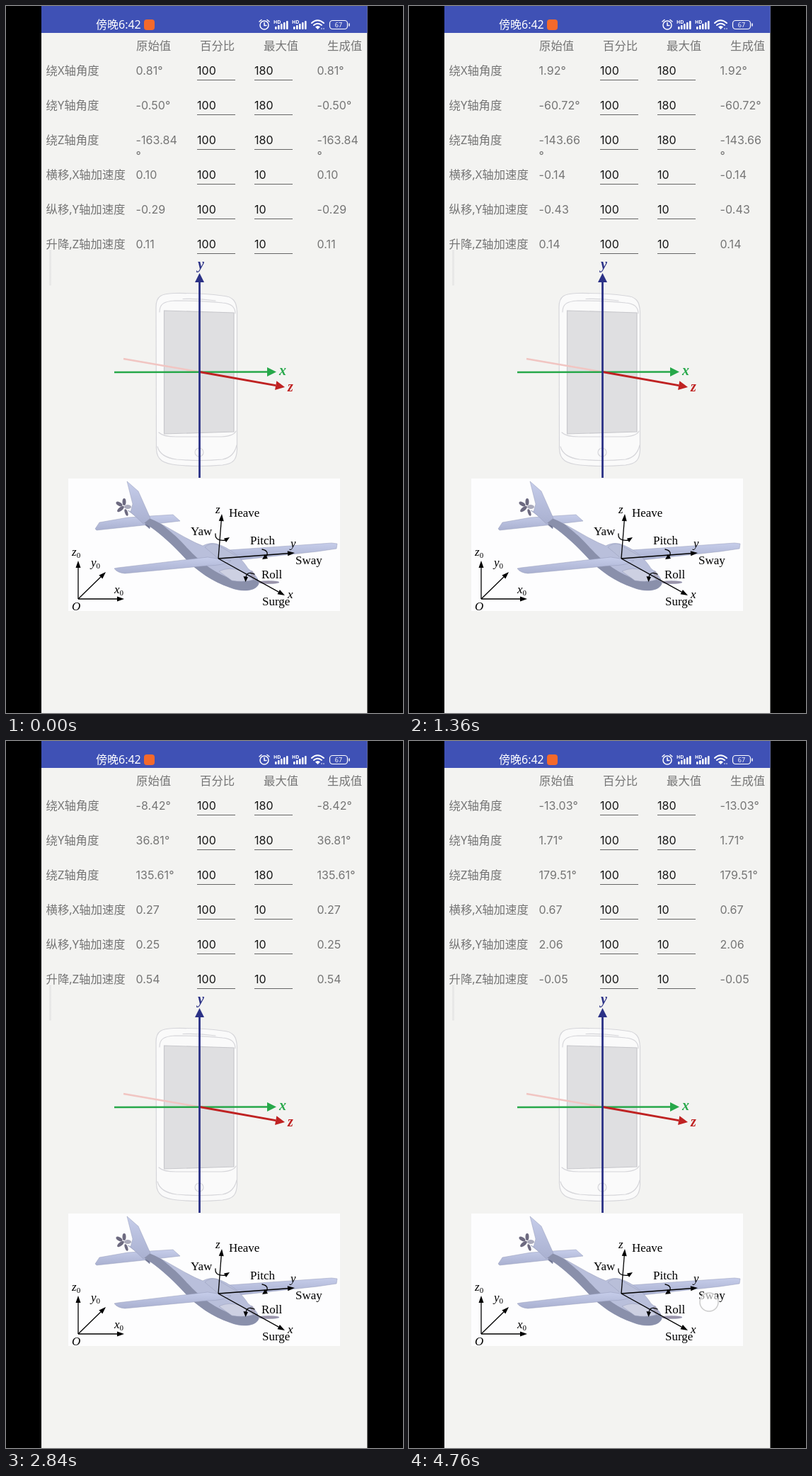
An HTML page for the animation above (4800 ms loop, 561x998 px).

```html
<!DOCTYPE html>
<html lang="zh">
<head>
<meta charset="utf-8">
<title>Motion sensor readout</title>
<style>
html, body { margin: 0; width: 100%; height: 100%; overflow: hidden; background: #000; }
svg { display: block; width: 561px; height: 998px; }
.ui { font: 16.4px "Noto Sans", "Noto Sans CJK SC", "Noto Sans CJK", sans-serif; fill: #757575; }
.num { font: 16px Inter, sans-serif; letter-spacing: .1px; }
.input { fill: #151515; }
.axis { font: italic bold 20px "Liberation Serif", serif; }
.label { font: 17px "Liberation Serif", serif; fill: #000; }
.label .i { font-style: italic; }
.sub { font-size: 11px; font-style: normal; }
.line { fill: none; stroke-linecap: round; }
</style>
</head>
<body>
<svg viewBox="0 0 561 998">
  <defs>
    <linearGradient id="wing" x1="0" y1="0" x2="0" y2="1">
      <stop offset="0" stop-color="#c6cdea"/><stop offset="1" stop-color="#a9b0d0"/>
    </linearGradient>
    <clipPath id="hull"><path id="hullShape" d="M172 712L204 724C228 734 256 754 278 762Q287 757 297 759C318 765 334 781 342 794Q358 806 357 816C352 827 332 827 317 821C288 811 267 795 248 774C232 757 213 740 196 730Z"/></clipPath>
  </defs>
  <rect width="561" height="998"/>
  <rect x="50" width="460.500" height="998" fill="#f3f3f1"/>
  <rect x="50" width="460.500" height="38" fill="#3f51b5"/>

  <!-- status bar -->
  <g fill="#fff" font-family="Noto Sans, Noto Sans CJK SC, sans-serif">
    <text x="127" y="32" font-size="16" font-weight="500">傍晚6:42</text>
    <rect x="195" y="19" width="15" height="15" rx="4" fill="#f4692b"/>
    <g class="line" stroke="#fff" stroke-width="1.500">
      <circle cx="365" cy="27" r="6"/>
      <path d="M365 23.500V27.500H368M358 22L361 19.500M372 22L369 19.500"/>
      <path d="M432 24Q440 16.500 449 24M435 27Q440 22.500 446 27" stroke-width="2"/>
      <rect x="457.500" y="20.500" width="25" height="12" rx="4" stroke-width="1.200"/>
      <path d="M485 25V28"/>
    </g>
    <path d="M437 29.500Q440.500 26.500 444 29.500L440.500 33Z"/>
    <circle cx="446" cy="32" r=".8"/><circle cx="449" cy="32" r=".8"/>
    <text x="470" y="30" font-size="9" font-weight="500" text-anchor="middle">67</text>
    <g id="signals" font-size="7" font-weight="600"></g>
  </g>

  <g id="table" class="ui"></g>
  <path d="M62.500 345V395" stroke="#ddd" stroke-width="3" stroke-dasharray="1 1"/>

  <!-- phone -->
  <g class="line" stroke="#d6d6da" stroke-width="1.200">
    <path d="M212 425C212 409 220 406 237 405.500Q275 405 306 409C321 410 326 417 326.500 432V626C326 641 321 646 306 648Q272 651 242 648C222 646 213 641 212.500 625Z" fill="#fafafa"/>
    <path d="M217 432C217 420 224 417 238 416Q277 416 306 419C319 420 324 426 324 434M214 622Q218 637 241 640Q274 643 306 640Q322 637 326 620"/>
    <path d="M216 602Q222 608 240 608H305Q322 607 325 600M250 413.500Q273 412.500 296 416"/>
    <circle cx="273" cy="630" r="6"/>
    <path d="M223.500 430L322 433V601L223.500 604Z" fill="#dfdfe1" stroke="#c8c8cc"/>
  </g>
  <path d="M166 498L273 516.500" stroke="#f1c5c2" stroke-width="2.500"/>
  <g id="phoneAxes"></g>
  <g class="axis">
    <text x="271" y="371" fill="#2b3186">y</text>
    <text x="386" y="521" fill="#27a84a">x</text>
    <text x="398" y="544" fill="#bf2222">z</text>
  </g>

  <!-- aircraft -->
  <rect x="88" y="667" width="384" height="187" fill="#fdfdfe"/>
  <g stroke="#959bb8" stroke-width=".5">
    <g fill="#6d6a80" stroke="none">
      <ellipse cx="160" cy="703" rx="5" ry="2.500" transform="rotate(30 160 703)"/>
      <ellipse cx="167" cy="700" rx="2.500" ry="5"/>
      <ellipse cx="162" cy="710" rx="2.500" ry="6" transform="rotate(50 162 710)"/>
      <ellipse cx="170" cy="715" rx="2" ry="5" transform="rotate(-20 170 715)"/>
      <ellipse cx="172" cy="707" rx="5" ry="3" fill="#aab"/>
    </g>
    <path d="M126 738L132 729L172 722L236 718L246 727L203 732L128 740Z" fill="url(#wing)"/>
    <path d="M196 732L204 730L203 738Z" fill="#707590"/>
    <path d="M280 774L300 769L460 758L468 759L467 766L440 770L330 782Z" fill="url(#wing)"/>
    <use href="#hullShape" fill="#b9bfdb"/>
    <g class="line" clip-path="url(#hull)">
      <path id="belly" d="M204 734C232 757 232 757 248 774C267 795 288 811 317 821Q336 827 357 820" stroke="#7d829c" stroke-opacity=".5" stroke-width="24"/>
      <use href="#belly" stroke="#4f5368" stroke-width="10"/>
    </g>
    <path d="M281 764Q288 757 298 760L328 778L300 780Z" fill="#b9bfd9"/>
    <path d="M301 798Q315 791 331 797L350 810Q335 814 319 811Z" fill="#cdd0e2"/>
    <path d="M153 794L158 793L285 778L318 783Q307 790 285 790L168 801Q157 800 153 794Z" fill="url(#wing)"/>
    <path d="M171 671L187 685L204 723L194 731L176 714L179 703Z" fill="url(#wing)"/>
    <ellipse cx="371" cy="813.500" rx="15" ry="2" fill="#9a93a8"/>
    <ellipse cx="349" cy="804" rx="2.500" ry="7" fill="#aaa7bb" transform="rotate(-20 349 804)"/>
  </g>
  <g id="planeAxes"></g>
  <path class="line" stroke="#000" stroke-width="1.300" d="M296 745Q295 756 311 754M362 767Q372 769 368 777M351 802Q340 797 339 807"/>
  <path d="M316 750L308 751.500L311 757ZM362 781L370 780L366 774ZM338.500 813L335.500 805L342 806Z"/>
  <g class="label">
    <text x="315" y="721">Heave</text><text x="261" y="747">Yaw</text>
    <text x="345" y="760">Pitch</text><text x="409" y="788">Sway</text>
    <text x="361" y="808">Roll</text><text x="362" y="846">Surge</text>
    <g class="i">
      <text x="296" y="716">z</text><text x="402" y="764">y</text><text x="398" y="836">x</text>
      <text x="93" y="853">O</text>
      <text x="93" y="776">z<tspan class="sub" dy="3">0</tspan></text>
      <text x="120" y="791">y<tspan class="sub" dy="3">0</tspan></text>
      <text x="153" y="829">x<tspan class="sub" dy="3">0</tspan></text>
    </g>
  </g>
  <circle id="touch" cx="424" cy="792" r="13" fill="#fff" fill-opacity=".6" stroke="#ccc" stroke-width="1.500"/>
</svg>
<script>
const $ = id => document.getElementById(id);
const text = (x, y, content, cls = '') => `<text class="${cls}" x="${x}" y="${y}">${content}</text>`;

function arrow(x1, y1, x2, y2, color, width, length, half) {
  const angle = Math.atan2(y2 - y1, x2 - x1);
  const bx = x2 - length * Math.cos(angle), by = y2 - length * Math.sin(angle);
  const dx = half * Math.sin(angle), dy = half * Math.cos(angle);
  return `<path d="M${x1} ${y1}L${bx} ${by}" stroke="${color}" stroke-width="${width}"/>
    <path d="M${x2} ${y2}L${bx - dx} ${by + dy}L${bx + dx} ${by - dy}Z" fill="${color}"/>`;
}

$('phoneAxes').innerHTML =
  arrow(153, 517, 382, 516.5, '#27a84a', 2.5, 13, 6.5) +
  arrow(273.5, 516.5, 394, 538, '#bf2222', 2.8, 13, 6.5) +
  arrow(273.5, 666, 273.5, 377, '#2b3186', 2.8, 13, 6.5);

$('planeAxes').innerHTML = [
  [300, 780, 305, 717], [300, 780, 408, 772], [300, 780, 394, 832],
  [102, 837, 102, 783], [102, 837, 141, 799], [102, 837, 167, 837]
].map(p => arrow(...p, '#000', 1.3, 10, 3.5)).join('');

$('signals').innerHTML = [378, 404].map(x => text(x, 24.5, 'HD') +
  [4, 6, 8, 10, 12].map((h, i) => `<rect x="${x + 2 + i * 4}" y="${33 - h}" width="2.6" height="${h}" rx="1"/>`).join('')
).join('');

// Readings at key times; the yaw row is unwrapped past -180.
const times = [0, 800, 1360, 2160, 2840, 3880, 4760];
const rows = [
  ['绕X轴角度', [.81, 3.93, 1.92, -4.66, -8.42, -71.88, -13.03]],
  ['绕Y轴角度', [-.5, -39.24, -60.72, 29.32, 36.81, -5.17, 1.71]],
  ['绕Z轴角度', [-163.84, -140.5, -143.66, -220.19, -224.39, -96.2, -180.49]],
  ['横移,X轴加速度', [.1, -1.92, -.14, 4.17, .27, .66, .67]],
  ['纵移,Y轴加速度', [-.29, .04, -.43, -.68, .25, .37, 2.06]],
  ['升降,Z轴加速度', [.11, .68, .14, 1.67, .54, -.1, -.05]]
];
const baseline = row => 97 + row * 49;

$('table').innerHTML =
  ['原始值', '百分比', '最大值', '生成值'].map((s, i) => text(184 + i * 90, 62, s)).join('') +
  rows.map(([name], i) => {
    const y = baseline(i);
    return text(56.5, y, name) +
      text(270, y, 100, 'num input') + text(351, y, i < 3 ? 180 : 10, 'num input') +
      `<path d="M270 ${y + 7.5}h54M351 ${y + 7.5}h54" stroke="#666"/>` +
      [183.5, 439.5].map(x => text(x, y, '<tspan></tspan><tspan></tspan>', 'num value')).join('');
  }).join('');
const cells = [...document.querySelectorAll('.value')];

function reading(row, t) {
  const keys = rows[row][1];
  let k = 0;
  while (k < times.length - 2 && t >= times[k + 1]) k++;
  const u = (t - times[k]) / (times[k + 1] - times[k]);
  const ease = (1 - Math.cos(Math.PI * u)) / 2;
  let value = keys[k] + (keys[k + 1] - keys[k]) * ease;
  if (row > 2) value += .8 * Math.sin(Math.PI * u) * Math.sin(t / 90 + row * 2);
  if (value < -180) value += 360;
  return value.toFixed(2);
}

function draw() {
  const t = Math.floor(performance.now() % 4800 / 40) * 40;
  cells.forEach((cell, i) => {
    const row = i >> 1, value = reading(row, Math.min(t, 4760));
    const [digits, degree] = cell.children;
    digits.textContent = value;
    degree.textContent = row < 3 ? '°' : '';
    if (row < 3 && value.length > 6) { // the degree sign wraps to a second line
      degree.setAttribute('x', cell.getAttribute('x'));
      degree.setAttribute('y', baseline(row) + 22);
    } else {
      degree.removeAttribute('x');
      degree.removeAttribute('y');
    }
  });
  $('touch').style.display = t >= 4720 ? '' : 'none';
  requestAnimationFrame(draw);
}
draw();
</script>
</body>
</html>
```
